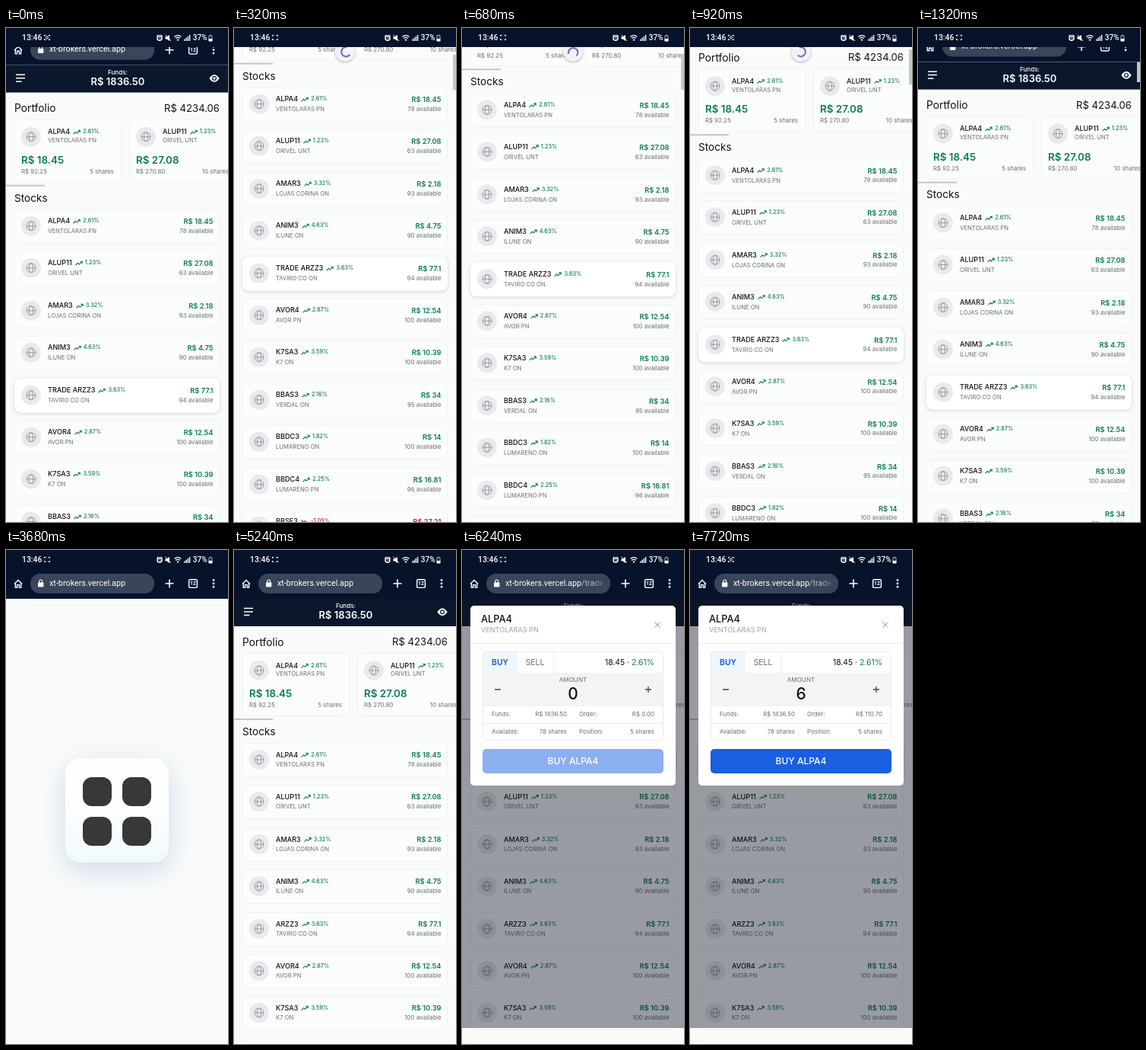
Animation of 292x648 px, one loop 8 s. Source, as an HTML page:

```html
<!DOCTYPE html>
<html lang="en">
<head>
<meta charset="utf-8">
<title>Stock trading app</title>
<style>
  html, body { margin: 0; width: 100%; height: 100%; overflow: hidden; background: #f9fbfb; }
  #stage { position: relative; width: 292px; height: 648px; overflow: hidden; background: #f9fbfb;
    font-family: Inter, sans-serif; color: #111; }
  #stage div, #stage svg { position: absolute; box-sizing: border-box; }
  svg { overflow: visible; fill: none; stroke: currentColor; }
  .t { white-space: nowrap; line-height: 1.2; transform: translateY(-50%); }
  .t.r { transform: translate(-100%, -50%); }
  .t.c { transform: translate(-50%, -50%); }
  .m { font-weight: 500; }
  .b { font-weight: 600; }
  .up { color: #0b7a53; }
  .down { color: #c81e2c; }
  .sub { color: #6a6d72; }
  .muted { color: #9ca3af; }
  .w { color: #fff; }
  .sys { font-family: Roboto, sans-serif; color: #fff; }

  .page, .toolbar, .thumb, .head, .list, .splash, .spinner, .load, .dim, .modal, .buy {
    animation: 8s linear infinite; }

  .status { left: 0; top: 0; width: 292px; height: 25px; background: #07132b; color: #fff; }
  .toolbar { left: 0; top: 25px; width: 292px; height: 39px; background: #07132b; color: #fff; animation-name: toolbar; }
  .pill { left: 32px; top: 6px; width: 163px; height: 26px; border-radius: 13px; background: #3a455b; overflow: hidden; }
  .pill .fade { right: 0; width: 22px; height: 26px; background: linear-gradient(90deg, #3a455b00, #3a455b 70%); }
  #path { color: #b4bac6; }
  .load { left: 0; top: 36.5px; width: 292px; height: 1.6px; background: #fff; transform-origin: 0 0; animation-name: load; }
  .dot { animation: dot 1s linear infinite; }

  .page { left: 0; top: 0; width: 292px; height: 900px; animation-name: scroll; }
  .head { left: 0; top: 64px; width: 292px; height: 36px; background: #0a172d; animation-name: head; }
  .list { left: 0; top: 0; width: 292px; height: 900px; animation-name: list; }
  .card { border: 1px solid #eff1f2; border-radius: 8px; background: #fbfdfd; }
  .card.hover { border-color: #fff; background: #fff; box-shadow: 0 1px 4px rgba(20, 30, 40, .18); }
  .coin { width: 26px; height: 26px; border-radius: 50%; background: #e9eaed; color: #979ba2; }
  .name { display: flex; align-items: center; font-size: 9.1px; font-weight: 500; }
  #stage .name svg { position: static; margin: 0 3px 0 4px; }
  .name small { font-size: 7.3px; }
  .thumb { left: 288px; top: 25px; width: 4px; height: 46px; background: #c4c6c8; animation-name: thumb; }

  .splash { left: 78px; top: 273px; width: 136px; height: 137px; border-radius: 20px;
    background: linear-gradient(#fdfefe 45%, #effafd); box-shadow: 0 10px 36px rgba(50, 80, 160, .2); animation-name: splash; }
  .splash div { width: 38px; height: 38px; border-radius: 12px; background: #383838; }

  .spinner { left: 133px; top: 78px; width: 26px; height: 26px; border-radius: 50%; background: #f4f2f9;
    box-shadow: 0 1px 3px rgba(0, 0, 0, .3); animation-name: spinner; }
  .spinner svg { left: 13px; top: 13px; color: #5a5c9e; animation: spin 1s linear infinite; }

  .dim { left: 0; top: 64px; width: 292px; height: 563px; background: rgba(15, 20, 35, .42); animation-name: dim; }
  .modal { left: 11px; top: 73px; width: 270px; height: 236px; border-radius: 5px; background: #fff; animation-name: modal; }
  .modal .in { left: -11px; top: -73px; width: 292px; height: 648px; }
  .line { background: #ececee; }
  .buy { left: 27px; top: 261px; width: 238px; height: 32px; border-radius: 5px; background: #1a5fe0; animation-name: buy; }

  @keyframes scroll {
    0% { transform: translateY(-15px); }
    1% { transform: translateY(-39px); }
    4% { transform: translateY(-175px); animation-timing-function: ease-out; }
    6.25% { transform: translateY(-204px); animation-timing-function: ease-in; }
    8.5% { transform: translateY(-168px); }
    11.5% { transform: translateY(-82px); }
    14.5% { transform: translateY(-39px); }
    18.5%, 100% { transform: none; }
  }
  @keyframes toolbar {
    0% { transform: translateY(-15px); }
    1%, 14.5% { transform: translateY(-39px); }
    18.5%, 100% { transform: none; }
  }
  @keyframes thumb {
    0% { transform: none; opacity: 0; }
    1% { transform: none; opacity: 1; }
    4% { transform: translateY(10.2px); }
    6.25% { transform: translateY(12.4px); }
    8.5% { transform: translateY(9.7px); }
    11.5% { transform: translateY(3.2px); }
    14.5%, 18.5% { transform: none; opacity: 1; }
    21%, 100% { transform: none; opacity: 0; }
  }
  @keyframes spinner {
    0%, 21.4% { transform: translateY(-60px); animation-timing-function: ease-out; }
    26%, 28.5% { transform: translateY(18px); }
    30.5%, 37% { transform: none; }
    38.5%, 100% { transform: scale(0); }
  }
  @keyframes spin { to { transform: rotate(360deg); } }
  @keyframes load {
    0%, 30.5% { transform: scaleX(0); opacity: 1; }
    31%  { transform: scaleX(.048); }
    37.5% { transform: scaleX(.6); }
    43% { transform: scaleX(1); opacity: 1; }
    45%, 100% { transform: scaleX(1); opacity: 0; }
  }
  @keyframes head { 0%, 37.5% { opacity: 1; } 37.51%, 47.5% { opacity: 0; } 48%, 100% { opacity: 1; } }
  @keyframes list { 0%, 37.5% { opacity: 1; } 37.51%, 55% { opacity: 0; } 56.5%, 100% { opacity: 1; } }
  @keyframes splash { 0%, 41.5% { opacity: 0; } 44%, 46.5% { opacity: 1; } 48.5%, 100% { opacity: 0; } }
  @keyframes dim { 0%, 69.5% { opacity: 0; } 74%, 100% { opacity: 1; } }
  @keyframes modal {
    0%, 69.5% { opacity: 0; transform: scale(.95); animation-timing-function: ease-out; }
    74%, 100% { opacity: 1; transform: none; }
  }
  @keyframes buy { 0%, 82.5% { opacity: .5; } 84.5%, 100% { opacity: 1; } }
  @keyframes dot { 0%, 23.9% { opacity: 1; } 24%, 69% { opacity: 0; } 69.1%, 100% { opacity: 1; } }
</style>
</head>
<body>
<svg width="0" height="0" style="position:absolute">
  <symbol id="globe" viewBox="-7 -7 14 14">
    <circle r="6"/><ellipse rx="2.6" ry="6"/><path d="M-6 0H6"/>
  </symbol>
  <symbol id="rise" viewBox="0 0 10 7"><path d="M.6 6 3.5 3.1 5.3 4.8 9 1.2M6.4 1H9.2V3.8"/></symbol>
  <symbol id="fall" viewBox="0 0 10 7"><path d="M.6 1 3.5 3.9 5.3 2.2 9 5.8M6.4 6H9.2V3.2"/></symbol>
</svg>

<div id="stage">
  <div class="page">
    <div class="head">
      <svg width="292" height="36" color="#fff" stroke-width="1.5">
        <path d="M13 12.6H25M13 17H25M13 21.6H20.5"/>
        <path d="M267.3 17.3Q274 7.6 280.7 17.3 274 27 267.3 17.3Z" fill="#fff" stroke="none"/>
        <circle cx="274" cy="17.3" r="2.4" stroke="#0a172d" stroke-width="1.2"/>
      </svg>
    </div>
    <div class="list"></div>
  </div>
  <div class="thumb"></div>
  <div class="splash">
    <div style="left:23px;top:25px"></div><div style="left:75px;top:25px"></div>
    <div style="left:23px;top:77px"></div><div style="left:75px;top:77px"></div>
  </div>
  <div class="spinner"><svg width="1" height="1"><path d="M1-6A6 6 0 1 1-5.6 2" stroke-width="1.8"/></svg></div>
  <div class="dim"></div>
  <div class="modal"><div class="in"></div></div>

  <div class="toolbar">
    <div class="pill"></div>
    <svg width="292" height="39" stroke-width="1.4">
      <path d="M11 19.5 16 14.6 21 19.5M12.3 18.6V24.2H14.6V20.6H17.4V24.2H19.7V18.6"/>
      <rect x="42" y="17.4" width="7.4" height="6" rx="1" fill="#fff" stroke="none"/>
      <path d="M43.7 18V16.2a2 2 0 0 1 4 0V18" stroke-width="1.1"/>
      <path d="M209.5 19H220.5M215 13.5V24.5" stroke-width="1.6"/>
      <rect x="240.6" y="13.8" width="10.8" height="10.6" rx="2"/>
      <g fill="#fff" stroke="none"><circle cx="273" cy="14.6" r="1.4"/><circle cx="273" cy="19" r="1.4"/><circle cx="273" cy="23.4" r="1.4"/></g>
    </svg>
    <div class="load"></div>
  </div>

  <div class="status">
    <svg width="292" height="25">
      <path d="M50.5 11V9.5H52.5M55.5 9.5H57.5V11M57.5 14V15.5H55.5M52.5 15.5H50.5V14"/>
      <circle class="dot" cx="54" cy="12.5" r="1.5"/>
      <circle cx="202" cy="13.2" r="3" stroke-width="1.5"/><path d="M198.2 10.6 200.4 9M205.8 10.6 203.6 9M202 11.5V13.4H203.4"/>
      <path d="M209.5 11.5H211.5L215 9V17L211.5 14.6H209.5Z" fill="#fff" stroke="none"/><path d="M209.5 8.8 217 17"/>
      <path d="M221.5 11.6Q226 7.6 230.5 11.6M223.2 13.6Q226 11.2 228.8 13.6" stroke-width="1.3"/><circle cx="226" cy="15.6" r="1.2" fill="#fff" stroke="none"/>
      <path d="M235 17V14.6M237.2 17V12.8M239.4 17V11M241.6 17V9" stroke-width="1.4"/>
      <path d="M267 10H271V17H267ZM268 9.4H270" stroke="#a7adb8"/><path d="M266.6 14H271.4V17.4H266.6Z" fill="#fff" stroke="none"/>
    </svg>
  </div>
</div>

<script>
  const $ = s => document.querySelector(s);
  const add = (s, html) => $(s).insertAdjacentHTML('beforeend', html);
  const label = (x, y, size, text, cls = '', id = '') =>
    `<div class="t ${cls}" ${id && `id="${id}"`} style="left:${x}px;top:${y}px;font-size:${size}px">${text}</div>`;
  const box = (x, y, w, h, cls, extra = '') =>
    `<div class="${cls}" style="left:${x}px;top:${y}px;width:${w}px;height:${h}px;${extra}"></div>`;
  const icon = (id, w, h, extra = '') => `<svg width="${w}" height="${h}" ${extra}><use href="#${id}"/></svg>`;
  const coin = (x, y) => `<div class="coin" style="left:${x}px;top:${y}px">
    ${icon('globe', 14, 14, 'style="left:6px;top:6px"')}</div>`;
  const tone = change => change < 0 ? 'down' : 'up';
  const title = (x, y, code, change) => `<div class="t name" style="left:${x}px;top:${y}px"><span>${code}</span>
    ${icon(change < 0 ? 'fall' : 'rise', 10, 7, `class="${tone(change)}" stroke-width="1.1"`)}
    <small class="${tone(change)}">${change}%</small></div>`;

  const stocks = [
    ['ALPA4', 'VENTOLARAS PN', 2.61, '18.45', 78],
    ['ALUP11', 'ORIVEL UNT', 1.23, '27.08', 63],
    ['AMAR3', 'LOJAS CORINA ON', 3.32, '2.18', 93],
    ['ANIM3', 'ILUNE ON', 4.63, '4.75', 90],
    ['ARZZ3', 'TAVIRO CO ON', 3.63, '77.1', 94],
    ['AVOR4', 'AVOR PN', 2.87, '12.54', 100],
    ['K7SA3', 'K7 ON', 3.59, '10.39', 100],
    ['BBAS3', 'VERDAL ON', 2.16, '34', 95],
    ['BBDC3', 'LUMARENO ON', 1.82, '14', 100],
    ['BBDC4', 'LUMARENO PN', 2.25, '16.81', 96],
    ['BBSE3', 'NORTEPLENA ON', -1.05, '27.21', 92],
  ];

  const holding = (x, [code, firm, change, price], total, shares) =>
    box(x, 135, 141, 83, 'card') + coin(x + 9, 145) + title(x + 44, 152, code, change) +
    label(x + 44, 163.3, 7.7, firm, 'sub') + label(x + 9, 188, 13.4, 'R$ ' + price, 'b up') +
    label(x + 9, 203.5, 7.9, 'R$ ' + total, 'sub') + label(x + 131, 203.5, 7.9, shares + ' shares', 'sub r');

  const row = ([code, firm, change, price, left], i) => {
    const y = 253 + i * 55.4;
    return `<div class="row">${box(11, y, 270, 45, 'card') + coin(20, y + 9) + title(55, y + 16, code, change) +
      label(55, y + 29, 7.7, firm, 'sub') + label(272.5, y + 16, 9.3, 'R$ ' + price, 'b r ' + tone(change)) +
      label(272.5, y + 29, 7.9, left + ' available', 'sub r')}</div>`;
  };

  add('.head', label(147, 10, 8.1, 'Funds:', 'w c m') + label(147, 22, 13, 'R$ 1836.50', 'w c b'));
  add('.list', label(11, 120.5, 13.8, 'Portfolio') + label(281, 120.5, 13.1, 'R$ 4234.06', 'r') +
    holding(11, stocks[0], '92.25', 5) + holding(162, stocks[1], '270.80', 10) +
    box(0, 220.5, 51, 2.6, '', 'background:#c4c6c8') +
    label(11, 238, 13.6, 'Stocks') + stocks.map(row).join(''));

  add('.pill', label(25, 13, 10.8, 'xt-brokers.vercel.app<span id="path"></span>', 'sys') + '<div class="fade"></div>');
  add('.toolbar', label(246, 19.2, 6.8, '12', 'sys c b'));
  add('.status', label(21, 13, 10.4, '13:46', 'sys m') + label(264.5, 13, 10, '37%', 'sys m r'));

  const fact = (x, y, key, value, id) =>
    label(x, y, 7.9, key, 'sub') + label(x + 99, y, 7.9, value, 'sub r', id);
  add('.modal .in',
    label(25, 91, 12.8, stocks[0][0], 'm') + label(25, 104.5, 9.1, stocks[0][1], 'muted') +
    '<svg width="1" height="1" style="left:257px;top:98px" color="#999"><path d="M-3.6-3.6 3.6 3.6M3.6-3.6-3.6 3.6"/></svg>' +
    box(11, 122, 270, 1, 'line') +
    box(27, 133, 238, 117, '', 'border:1px solid #ececee;border-radius:3px') +
    box(28, 134, 45, 27, '', 'background:#eff6fe') + box(120, 134, 1, 27, 'line') +
    label(50, 147.5, 10.4, 'BUY', 'c b', 'buyTab') + label(96, 147.5, 10.4, 'SELL', 'c sub') +
    label(253, 147.5, 10.4, '18.45 · <span class="up">2.61%</span>', 'r') +
    box(28, 161, 236, 44, '', 'background:#f3f4f6') +
    label(146, 170.5, 8.1, 'AMOUNT', 'c sub') + label(146, 188.5, 21, '0', 'c m', 'amount') +
    '<svg width="1" height="1" style="left:0;top:183px" color="#444" stroke-width="1.3"><path d="M43 0H51M241 0H249M245-4V4"/></svg>' +
    box(28, 227, 236, 1, 'line') +
    fact(39, 216, 'Funds:', 'R$ 1836.50') + fact(154, 216, 'Order:', '', 'order') +
    fact(39, 238.5, 'Available:', '78 shares') + fact(154, 238.5, 'Position:', '5 shares') +
    '<div class="buy"></div>' + label(146, 277, 12, 'BUY ALPA4', 'c w m'));
  $('#buyTab').style.color = '#1a56db';

  const taps = [6640, 6840, 7040, 7240, 7400, 7600];
  const rows = [...document.querySelectorAll('.row')];
  const names = rows.map(r => r.querySelector('.name span'));
  const put = (el, text) => { if (el.textContent !== text) el.textContent = text; };
  const clock = $('.page').getAnimations()[0];

  function tick() {
    const t = (clock.currentTime || 0) % 8000;
    const active = t < 3000 ? 4 : t >= 5400 ? 0 : -1;
    rows.forEach((r, i) => {
      put(names[i], (i === active ? 'TRADE ' : '') + stocks[i][0]);
      r.firstChild.classList.toggle('hover', i === active && (i || t >= 5560));
    });
    const n = taps.filter(tap => t >= tap).length;
    put($('#amount'), String(n));
    put($('#order'), 'R$ ' + (n * 18.45).toFixed(2));
    put($('#path'), t >= 5560 ? '/trade/ALPA4' : '');
    requestAnimationFrame(tick);
  }
  tick();
</script>
</body>
</html>
```
